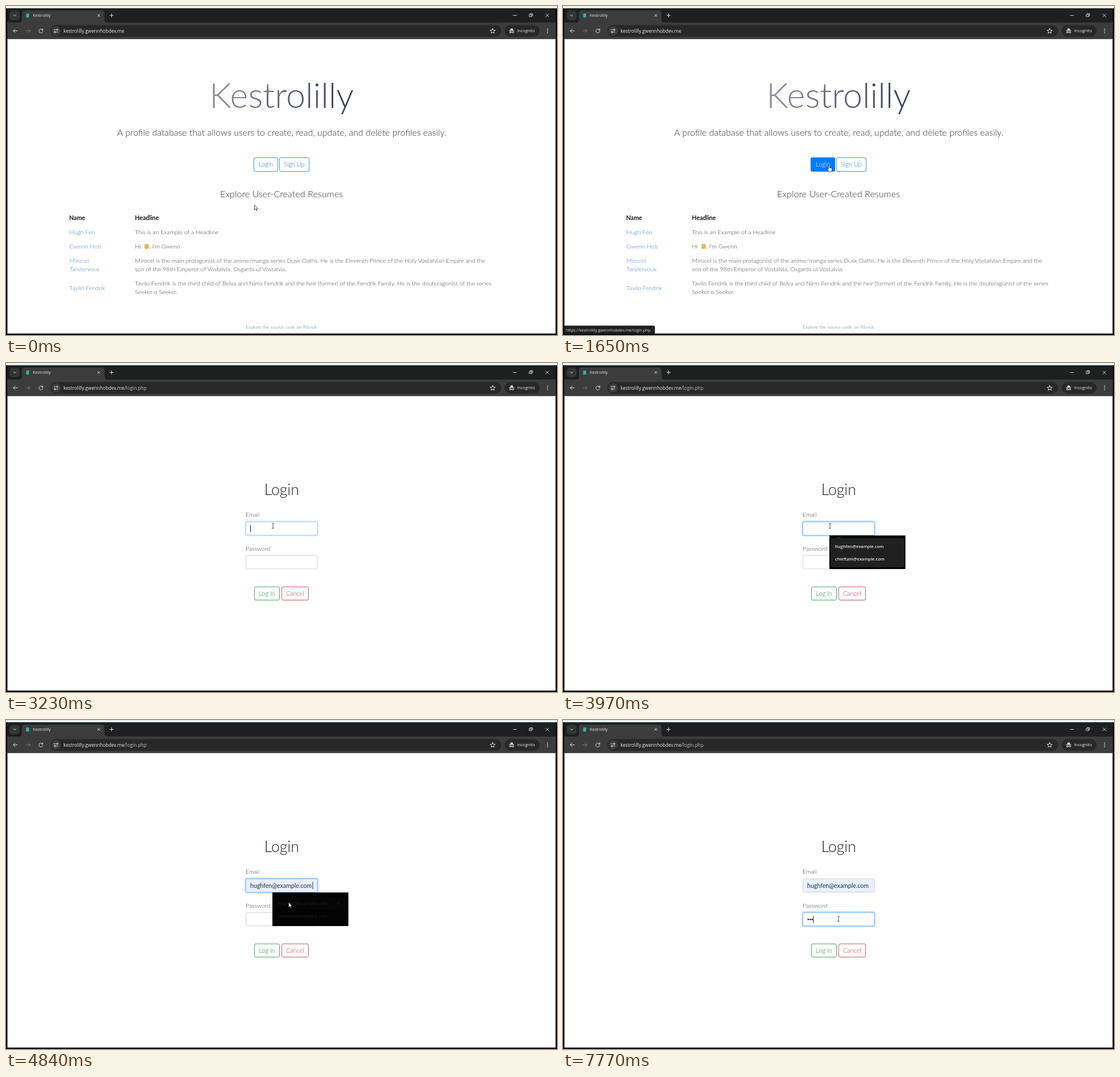
Recreate the animation shown at these times as an HTML page. Size 968 px wide and 578 px high, loop 8 s.

```html
<!DOCTYPE html>
<html lang="en">
<head>
<meta charset="utf-8">
<title>Kestrolilly</title>
<style>
html, body { margin: 0; width: 100%; height: 100%; overflow: hidden; background: #000; }
svg { display: block; width: 100vw; height: 100vh; }
.page text { font: 300 10.6px Lato, sans-serif; fill: #444; }
.ui text, text.ui { font: 400 8.2px "Open Sans", "Noto Sans", sans-serif; fill: #e6e6e6; }
.page .title { font-size: 61px; fill: url(#ink); }
.page .lead { font-size: 15.9px; fill: #333; }
.page .head { font-weight: 700; fill: #151515; }
.page .foot { font-size: 8.35px; fill: #666; }
.page .h1 { font-size: 26.6px; fill: #1c1f22; }
.page .typed { font-weight: 400; fill: #2b2f36; }
.page .link { fill: #3f7fd0; }
.page .btn { font-size: 10.9px; }
.mid { text-anchor: middle; }
.line { fill: none; stroke: #dcdcdc; stroke-width: 1; stroke-linecap: round; stroke-linejoin: round; }
.box { fill: #fff; stroke: #ced4da; }
#pop text { font-size: 7.5px; font-weight: 600; }
</style>
</head>
<body>
<svg viewBox="0 0 968 578" preserveAspectRatio="none">
  <defs>
    <linearGradient id="ink" gradientUnits="userSpaceOnUse" x1="360" y1="0" x2="608" y2="0">
      <stop offset="0" stop-color="#8e8c9b"/><stop offset="1" stop-color="#333a5b"/>
    </linearGradient>
  </defs>

  <!-- window -->
  <rect width="968" height="578" fill="#000"/>
  <rect width="968" height="4" fill="#e6f4f0"/>
  <rect x="2" y="4" width="964" height="26" fill="#1d2020"/>
  <rect x="2" y="29" width="964" height="30" fill="#3c3c3c"/>
  <path d="M23 29Q28 29 28 24V13Q28 8 33 8H168Q173 8 173 13V24Q173 29 178 29Z" fill="#3c3c3c"/>
  <rect x="2.500" y="58.200" width="963" height="517.300" fill="#fff"/>

  <g class="ui">
    <rect x="6.500" y="8.500" width="17.500" height="16.500" rx="5" fill="#343636"/>
    <path class="line" d="M13 15.600L15.200 17.800L17.400 15.600"/>
    <g id="spin"><circle cx="38" cy="16.500" r="5" fill="none" stroke="#a9c7f5" stroke-width="1.200" stroke-dasharray="20 12"/></g>
    <rect id="icon" fill="#2fb5ac"/>
    <text x="47" y="19.300" style="font-size:7px">Kestrolilly</text>
    <path class="line" d="M161 14.500L165 18.500M165 14.500L161 18.500M182.500 16.500H188.500M185.500 13.500V19.500"/>
    <path class="line" d="M891 16.500H897M919.500 14.800H923.500V18.800H919.500ZM921 14.500V13.300H925V17.300H924M948.300 13.800L953.700 19.200M953.700 13.800L948.300 19.200" style="stroke-width:.9"/>

    <rect x="78" y="33.500" width="792" height="20.500" rx="10.250" fill="#282828"/>
    <rect x="876" y="33.500" width="61.500" height="20.500" rx="10.250" fill="#282828"/>
    <path class="line" d="M20 43.700H13M16 40.500L12.800 43.700L16 46.900"/>
    <path class="line" d="M35 43.700H42M39 40.500L42.200 43.700L39 46.900" style="stroke:#777"/>
    <path class="line" d="M64 41.700A3.500 3.500 0 1 0 64.700 44.500M64.700 40V42.400H62.300"/>
    <circle cx="88" cy="43.800" r="8" fill="#3f3f3f"/>
    <path class="line" d="M84.500 41.800H87M91 45.800H88.800"/>
    <circle class="line" cx="89.800" cy="41.800" r="1.300"/><circle class="line" cx="86" cy="45.800" r="1.300"/>
    <text x="101" y="46.800" style="font-size:8.250px">kestrolilly.gwennhobdev.me<tspan id="path" fill="#bdbdbd">/login.php</tspan></text>
    <path class="line" d="M855 39.500L856.300 42.400L859.400 42.700L857 44.800L857.700 47.900L855 46.200L852.300 47.900L853 44.800L850.600 42.700L853.700 42.400Z"/>
    <path d="M885.700 42.500L886.500 39.500H890.300L891 42.500ZM883.700 42.800H893V43.800H883.700Z" fill="#e0e0e0"/>
    <path class="line" d="M887.400 46.200Q888.300 45.600 889.200 46.200"/>
    <circle class="line" cx="886" cy="46.200" r="1.400"/><circle class="line" cx="890.600" cy="46.200" r="1.400"/>
    <text x="898" y="46.400" style="font-size:7.200px;font-weight:500">Incognito</text>
    <g fill="#dcdcdc"><circle cx="951.500" cy="40.500" r=".9"/><circle cx="951.500" cy="43.700" r=".9"/><circle cx="951.500" cy="46.900" r=".9"/></g>
  </g>

  <!-- landing page -->
  <g class="page" id="home">
    <text class="title mid" x="484" y="179">Kestrolilly</text>
    <text class="lead mid" x="484.500" y="227.500">A profile database that allows users to create, read, update, and delete profiles easily.</text>
    <rect id="ring" x="434" y="265.500" width="45" height="26.500" rx="4" fill="none" stroke="#80bdff" stroke-width="2"/>
    <g fill="#fff" stroke="#4b95d6">
      <rect x="435.500" y="266.500" width="42" height="24" rx="2.500"/>
      <rect x="480.500" y="266.500" width="52" height="24" rx="2.500"/>
    </g>
    <text class="btn mid" x="456.700" y="282.200" style="fill:#1f74cc">Login</text>
    <text class="btn mid" x="506.200" y="282.200" style="fill:#1f74cc">Sign Up</text>
    <g id="fill">
      <rect x="435" y="266" width="43" height="25" rx="3" fill="#007bff"/>
      <text class="btn mid" x="456.700" y="282.200" style="fill:#fff">Login</text>
    </g>
    <text class="lead mid" x="484" y="335.500" style="font-size:16.200px">Explore User-Created Resumes</text>
    <g id="table"></g>
    <g transform="translate(246.500 422.500) rotate(-25)" fill="#f4b73c">
      <rect x="-2.500" y="-1" width="6.500" height="5.500" rx="2.200"/>
      <path d="M-1.700 1V-3.500M.2 0V-4.600M2 0V-4M3.600 1V-2.600M-1.500 3L-4 .6" stroke="#e9a52f" stroke-width="1.300" stroke-linecap="round"/>
    </g>
    <text class="foot mid" x="484" y="567">Explore the source code on <tspan class="link">Ribnuk</tspan></text>
  </g>

  <!-- login page -->
  <g class="page" id="login">
    <text class="h1 mid" x="484.300" y="232.300">Login</text>
    <text x="421" y="270">Email</text>
    <text x="421" y="329.700">Password</text>
    <rect class="box" x="421.500" y="279" width="125.500" height="23.500" rx="2.500" id="mail"/>
    <rect class="box" x="421.500" y="338.300" width="125.500" height="23.500" rx="2.500"/>
    <g fill="none" id="glowMail">
      <rect x="420.300" y="277.800" width="127.900" height="25.900" rx="3.500" stroke="#bfdeff" stroke-width="2.200"/>
      <rect x="421.500" y="279" width="125.500" height="23.500" rx="2.500" stroke="#80bdff"/>
    </g>
    <g fill="none" id="glowPass">
      <rect x="420.300" y="337.100" width="127.900" height="25.900" rx="3.500" stroke="#bfdeff" stroke-width="2.200"/>
      <rect x="421.500" y="338.300" width="125.500" height="23.500" rx="2.500" stroke="#80bdff"/>
    </g>
    <text class="typed" id="typed" x="429" y="294.500">hughfen@example.com</text>
    <g id="dots" fill="#333"></g>
    <rect id="caret" width="1" height="12.500" fill="#222"/>
    <rect x="436.500" y="393.300" width="44" height="23.200" rx="2.500" fill="#fff" stroke="#4aa568"/>
    <rect x="484.500" y="393.300" width="47" height="23.200" rx="2.500" fill="#fff" stroke="#cf5663"/>
    <text class="btn mid" x="458.700" y="408.500" style="fill:#1f8a40">Log In</text>
    <text class="btn mid" x="507.800" y="408.500" style="fill:#c23343">Cancel</text>
  </g>

  <g class="ui" id="pop">
    <rect x="468" y="303" width="133.500" height="59" fill="#000"/>
    <g id="list">
      <path d="M479.500 308L484.500 304L489.500 308Z" fill="#202020"/>
      <rect x="470" y="307.500" width="129.500" height="51.500" rx="4" fill="#202020"/>
      <g id="hover">
        <rect x="473" y="311" width="123" height="22" rx="2" fill="#3a3a3a"/>
        <path class="line" d="M582 319.700L586.600 324.300M586.600 319.700L582 324.300"/>
      </g>
      <text x="478" y="324.800">hughfen@example.com</text>
      <text x="478" y="347.200">chieftain@example.com</text>
    </g>
  </g>

  <g id="status">
    <path d="M2 561.500H159Q161.500 561.500 161.500 564V576H2Z" fill="#1f2121"/>
    <text class="ui" x="5" y="571.500" style="font-size:7.050px;fill:#d2d2d2">https://kestrolilly.gwennhobdev.me/login.php</text>
  </g>

  <g id="cursor" stroke-linejoin="round" stroke="#222" stroke-width=".8" fill="#fff">
    <path id="arrow" d="M0 0V8.600L2 6.900L3.300 9.800L4.600 9.200L3.300 6.400H6Z"/>
    <path id="hand" d="M-1 1A1 1 0 0 1 1 1V4.300L4.400 5.200Q5.500 5.600 5.400 6.700L4.700 11.400H.2L-2.900 7.700Q-3.200 6.300 -1.900 6.600L-1 7.400Z"/>
    <path id="beam" fill="none" d="M-2 -4.500Q0 -4.500 0 -3.600Q0 -4.500 2 -4.500M0 -3.600V3.600M-2 4.500Q0 4.500 0 3.600Q0 4.500 2 4.500"/>
  </g>
</svg>

<script>
const $ = id => document.getElementById(id);
const LOOP = 8000;

// x, baseline, class, text
const rows = [
  [111, 375.5, 'head', 'Name'], [226.5, 375.5, 'head', 'Headline'],
  [111.5, 400.8, 'link', 'Hugh Fen'], [226.5, 400.8, '', 'This is an Example of a Headline'],
  [111.5, 425.8, 'link', 'Gwenn Hob'], [226.5, 425.8, '', 'Hi'], [251.5, 425.8, '', ", I'm Gwenn"],
  [111.5, 451, 'link', 'Mirocel'], [111.5, 466, 'link', 'Tandervoux'],
  [226.5, 451, '', 'Mirocel is the main protagonist of the anime/manga series Dusk Oaths. He is the Eleventh Prince of the Holy Vostalvian Empire and the'],
  [226.5, 466, '', 'son of the 98th Emperor of Vostalvia, Osgards ul Vostalvia.'],
  [111.5, 498.5, 'link', 'Tavilo Fendrik'],
  [226.5, 491, '', 'Tavilo Fendrik is the third child of Belva and Nirro Fendrik and the heir (former) of the Fendrik Family. He is the deuteragonist of the series'],
  [226.5, 506, '', 'Seeker o Seeker.']
];
$('table').innerHTML = rows.map(([x, y, c, s]) => `<text class="${c}" x="${x}" y="${y}">${s}</text>`).join('');
$('dots').innerHTML = [0, 1, 2].map(i => `<circle cx="${430.9 + i * 3.5}" cy="350.4" r="1.45"/>`).join('');

const arrow = (x, y) => ({ cur: ['arrow', x, y] });
const hand = (x, y) => ({ cur: ['hand', x, y] });
const beam = (x, y) => ({ cur: ['beam', x, y] });
const mailCaret = x => [x, 284.5], passCaret = x => [x, 344.3];

// each step overrides part of the state from its time on
const steps = [
  [0, { ...arrow(436.5, 349.5), status: 0, fill: 0, ring: 0, spin: null, icon: 1, login: false,
        mail: 0, pass: 0, pop: false, list: 0, hover: false, typed: false, caret: null, dots: 0 }],
  [740, arrow(439, 344)], [822, arrow(445, 335)], [904, arrow(452, 325)],
  [986, arrow(458, 315)], [1068, arrow(463, 307)], [1150, arrow(466.5, 300.5)],
  [1320, { ...hand(467.3, 287.5), status: .5 }],
  [1500, { ...hand(467.3, 279.7), status: .9, fill: .4 }],
  [1575, { status: 1, fill: .85 }],
  [1650, { fill: 1 }],
  [1840, { ring: .5, spin: 0, icon: .7 }],
  [1925, { ring: 1, spin: 70 }], [2010, { spin: 140 }], [2095, { spin: 210 }], [2180, { spin: 280 }],
  [2360, { spin: 300 }],
  [2530, { login: true, spin: null, icon: .75 }],
  [2700, { icon: 1, status: .5 }],
  [2890, { status: 0 }],
  [3140, beam(469, 286)],
  [3230, { mail: .5, caret: mailCaret(429) }],
  [3320, { mail: 1, pop: true, list: .5 }],
  [3410, { list: 1 }],
  [3970, { caret: null }],
  [4220, { ...arrow(495, 317), typed: true }],
  [4310, { ...arrow(496.7, 320.5), hover: true }],
  [4500, { caret: mailCaret(538.5), list: .8 }],
  [4580, { list: .55 }], [4660, { list: .3 }], [4840, { list: .1 }],
  [4920, { pop: false }],
  [5100, { ...beam(484, 349.3), caret: null }],
  [5180, { mail: .5, pass: .5 }],
  [5260, { mail: 0, pass: 1, caret: passCaret(429) }],
  [5630, { caret: null }], [6150, { caret: passCaret(429) }], [6590, { caret: null }],
  [6850, { dots: 1, caret: passCaret(432.3) }],
  [7220, { dots: 2, caret: passCaret(435.8) }],
  [7770, { dots: 3, caret: passCaret(439.3) }]
];

const show = (id, on) => { $(id).style.display = on ? '' : 'none'; };
const fade = (id, v) => { $(id).style.opacity = v; };
const set = (id, attrs) => { for (const k in attrs) $(id).setAttribute(k, attrs[k]); };

function draw(t) {
  const s = {};
  for (const [at, part] of steps) if (at <= t) Object.assign(s, part);

  show('home', !s.login);
  show('login', s.login);
  show('path', s.login);
  fade('status', s.status);
  fade('fill', s.fill);
  fade('ring', s.ring);

  show('spin', s.spin !== null);
  set('spin', { transform: `rotate(${s.spin || 0} 38 16.5)` });
  const w = 5 * s.icon, h = 7 * s.icon;
  set('icon', { x: 38 - w / 2, y: 16.7 - h / 2, width: w, height: h });

  fade('glowMail', s.mail);
  fade('glowPass', s.pass);
  show('typed', s.typed);
  $('mail').style.fill = s.typed ? '#e8f0fe' : '#fff';
  [...$('dots').children].forEach((d, i) => { d.style.display = i < s.dots ? '' : 'none'; });
  show('caret', s.caret);
  if (s.caret) set('caret', { x: s.caret[0], y: s.caret[1] });

  show('pop', s.pop);
  fade('list', s.list);
  show('hover', s.hover);

  const [kind, x, y] = s.cur;
  for (const k of ['arrow', 'hand', 'beam']) show(k, k === kind);
  set('cursor', { transform: `translate(${x} ${y})` });
}

const start = performance.now();
function tick() {
  draw((performance.now() - start) % LOOP);
  requestAnimationFrame(tick);
}
tick();
</script>
</body>
</html>
```
